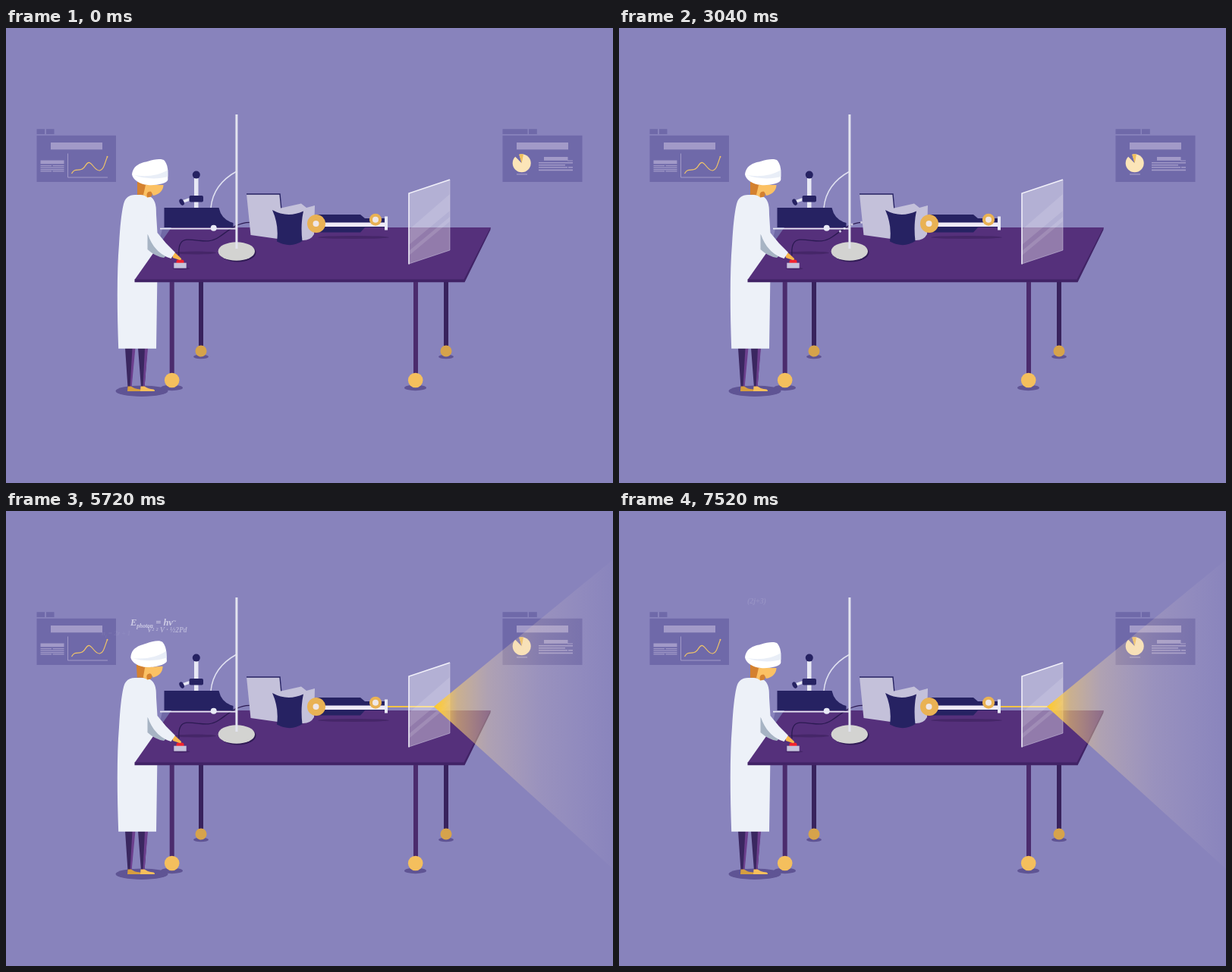
An HTML page that plays this animation: 800 px wide and 600 px high, repeating every 8.4 s.

```html
<!DOCTYPE html>
<html lang="en">
<head>
<meta charset="utf-8">
<title>Optics lab</title>
<style>
html, body { margin: 0; width: 100%; height: 100%; overflow: hidden; background: #8883bc; }
svg { display: block; width: 100vw; height: 100vh; }
.navy { fill: #262262; }
.pale { fill: #e8e9f5; }
.shade { fill: #5f5494; }
.coat { fill: #edf1f8; }
.panel { fill: #6f69a9; }
.bar { fill: #a29ac8; }
.formula { font: italic bold 10px "Liberation Serif", serif; fill: #f4f3fb; }
.formula .sub { font-size: .6em; }
</style>
</head>
<body>
<svg viewBox="0 0 800 600">
  <defs>
    <linearGradient id="glow" gradientUnits="userSpaceOnUse" x1="564" y1="0" x2="800" y2="0">
      <stop offset="0" stop-color="#ffc928"/>
      <stop offset=".06" stop-color="#fccb48" stop-opacity=".86"/>
      <stop offset=".13" stop-color="#f7ce70" stop-opacity=".6"/>
      <stop offset=".3" stop-color="#efd3a2" stop-opacity=".38"/>
      <stop offset=".6" stop-color="#e8d4c4" stop-opacity=".18"/>
      <stop offset="1" stop-color="#e0d2da" stop-opacity=".02"/>
    </linearGradient>
    <clipPath id="glassShape"><path d="M531 218L585 200V293L531 311Z"/></clipPath>
  </defs>
  <rect width="800" height="600" fill="#8883bc"/>

  <!-- wall panels -->
  <path class="panel" d="M40.5 133.3h10.5v6.7h-10.5zM53 133.3h10.5v6.7H53zM40.5 141.7H145V203H40.5z"/>
  <path class="bar" d="M59 151h68v9.2H59zM45.5 174.6h31v4.6h-31zM45.5 181h14.5v1.3h-14.5zM61.5 181h15v1.3h-15zM45.5 183.5h31v1.3h-31zM45.5 186h31v1.3h-31zM45.5 188.3h14.5v1.3h-14.5zM61.5 188.3h15v1.3h-15z"/>
  <path d="M81.5 165.5V197H134" fill="none" stroke="#a29ac8"/>
  <path d="M86.5 192C90 185 94 188 99 186.5C105 185 105 177 109.5 177.3C114 178 117 188.5 123.500 188C129 187 130 178 133.5 170" fill="none" stroke="#f0c468" stroke-width="1.2"/>
  <circle cx="133.5" cy="169.7" r="1" fill="#f0c468"/>

  <path class="panel" d="M654.5 133.3H687.5v6.7H654.5zM689 133.3h10.8v6.7H689zM654.5 141.7h105V203h-105z"/>
  <path class="bar" d="M673 151h68v9.2h-68zM709 170h31.5v4.8H709zM702 177h45v1.4h-45zM702 180h35v1.4h-35zM702 183h38v1.4h-38zM741 183h6v1.4h-6zM702 186.6h45v1.6h-45zM673 192.3h14v1.2h-14zM740 174.5h7v1h-7z"/>
  <circle cx="679.7" cy="178.3" r="12" fill="#fce5b8"/>
  <path d="M679.7 178.3L670 168.5L676 165.5Z" fill="#6f69a9"/>
  <path d="M679.7 178.3L676.2 166.8Q679 165.9 682 166.5Z" fill="#f0c05c"/>

  <!-- floor shadows and rear legs -->
  <g class="shade">
    <ellipse cx="179" cy="478.7" rx="34.5" ry="7.2"/>
    <ellipse cx="218.5" cy="474.4" rx="14.5" ry="3.8"/>
    <ellipse cx="257" cy="433.5" rx="10" ry="2.8"/>
    <ellipse cx="539.5" cy="474.4" rx="14.5" ry="3.8"/>
    <ellipse cx="580" cy="433.5" rx="10" ry="2.8"/>
  </g>
  <path d="M254 333h6v88h-6zM577 333h6v88h-6z" fill="#38225d"/>
  <g fill="#d6a34b"><circle cx="257" cy="426" r="7.5"/><circle cx="580" cy="426" r="7.5"/></g>

  <!-- scientist -->
  <path d="M157 422h12.5L165 474h-4.5zM174 422h12.5L182.5 474H178z" fill="#3a2760"/>
  <path d="M166.5 422h4L165.5 474h-2zM183 422h4L182.5 474h-2z" fill="#6c3f8d"/>
  <path d="M160.5 472.5H165Q169 476 177 476.5Q179 478 177.5 479H160Z" fill="#d69e3f"/>
  <path d="M177.5 472.5H182.5Q187 476 194.5 476.5Q197 478 195.5 479H177Z" fill="#f6bf5c"/>
  <path class="coat" d="M148.2 422.8Q145 335 149 285Q151 248 155 232Q158 220 170 220H184Q196 222 197.5 236L199.3 335L198 422.8Z"/>
  <g id="head">
    <path d="M173 203H194V216L188 223Q180 219 173 220Z" fill="#d4812f"/>
    <path d="M184 207H207.5Q207 218 194 221Q191 214 187 217L187 224L181 220Z" fill="#fbc164"/>
    <path d="M186 223Q184 216 190 215.5Q193 216 192.5 221Q190 224 186 223Z" fill="#d4812f"/>
    <path d="M166 193C167 186 170 183 173 181C178 177 184 177 188 175.5C195 173 206 171.5 209 175C212 179 213.5 184 213.3 190V200C213 205 197 208 187 207C176 206 167 200 166 193Z" fill="#fff"/>
    <path d="M168 193.500C181 197 202 195 213.3 187V196C200 200 181 199 168 193.500Z" fill="#e9eef7"/>
  </g>

  <!-- table -->
  <path d="M206 265H218L200 290Z" fill="#7069a6"/>
  <path d="M218 263H639L604.5 332H169.5Z" fill="#55307b"/>
  <path d="M169.5 331.5H603.5L638.5 263V266L604.5 335.3H169.5Z" fill="#412366"/>
  <path d="M215.7 335h6v122h-6zM537 335h6v122h-6z" fill="#4b2b6d"/>
  <g fill="#f4bf5d"><circle cx="218.7" cy="464.5" r="9.8"/><circle cx="539.7" cy="464.5" r="9.8"/></g>
  <g fill="#452668">
    <ellipse cx="250" cy="296.5" rx="27" ry="2"/>
    <ellipse cx="458" cy="276" rx="47" ry="2"/>
    <ellipse cx="231" cy="317.3" rx="11.5" ry="1.4"/>
  </g>

  <!-- cable and stand -->
  <path id="cable" d="M228 300C227 288 229 280 238 279.2C253 278 266 286 281 275.5C292 268.5 303 256.5 321 256.3" fill="none" stroke="#2b1a52" stroke-width="1.3"/>
  <g id="pulses" fill="#cfcce2"></g>
  <path class="navy" d="M208.5 237H280.5Q284 253 299.5 257V263H208.5Z"/>
  <path d="M203 264.6H304" stroke="#e8e9f5" stroke-width="1.8"/>
  <circle class="pale" cx="273.7" cy="263.8" r="4"/>
  <path class="pale" d="M248 196h5.5v41H248z"/>
  <path d="M233 229L243 225.5" stroke="#e8e9f5" stroke-width="3.5"/>
  <circle class="navy" cx="250.8" cy="193.6" r="5"/>
  <rect class="navy" x="241.5" y="221" width="18.5" height="8.6" rx="2"/>
  <ellipse class="navy" cx="231.6" cy="229.6" rx="2.8" ry="4.5" transform="rotate(-28 231.6 229.6)"/>
  <path d="M270 237Q273 206 304 189" fill="none" stroke="#e0e1f1" stroke-width="1.5"/>
  <ellipse cx="305.5" cy="296" rx="24" ry="12.5" fill="#301b55"/>
  <ellipse cx="303.8" cy="294.5" rx="24.2" ry="12.3" fill="#d3d3d1"/>
  <path d="M302.4 114h3v177h-3z" fill="#e3e4ef"/>

  <!-- projector -->
  <path d="M317 219H361L364 244L358 278L322.5 273Z" fill="#c4c1da"/>
  <path d="M317 219H361L363 240" fill="none" stroke="#262262" stroke-width="1.4"/>
  <path d="M351 240L389 231.5L396 237L407 234L392 243Q372 252 351 240Z" fill="#c4c1da"/>
  <path class="navy" d="M410 246H467L473 251H500V263H473L467 269.5H410Z"/>
  <path d="M407 234L406 272Q401 281 389 280Q388 250 392 241Z" fill="#c4c1da"/>
  <path class="navy" d="M351 240Q371 251 392 241.5Q388 259 390.5 281Q375 291 357 281.5Q360 260 351 240Z"/>
  <path d="M415 256.5h85v5.5h-85z" fill="#eeeaf6"/>
  <g fill="#e9b254"><circle cx="409" cy="258" r="12"/><circle cx="487" cy="252.7" r="8"/></g>
  <g fill="#efe7e8"><circle cx="408.5" cy="258" r="4"/><circle cx="487" cy="252.7" r="4"/></g>
  <path class="pale" d="M499 248.5h4v18h-4z"/>

  <!-- light and glass -->
  <path id="ray" d="M503 258H566" stroke="#f6c445" stroke-width="2.2" stroke-dasharray="63"/>
  <g clip-path="url(#glassShape)" fill="#fff">
    <path d="M531 200H585V311H531Z" opacity=".36"/>
    <path d="M531 266L585 219V241L531 286ZM531 294L585 249V255L531 300Z" opacity=".13"/>
  </g>
  <path d="M531 311.5V218L585 200" fill="none" stroke="#f2f1fa" stroke-width="1.6"/>
  <path d="M585 200V293L531 311" fill="none" stroke="#d8d5ea" stroke-opacity=".6" stroke-width=".8"/>
  <path id="cone" d="M564 258L800 64V472Z" fill="url(#glow)"/>

  <!-- button and arm -->
  <path id="knob" d="M224.5 311V308Q224.5 305.5 227 305.5H232Q234.5 305.5 234.5 308V311Z" fill="#f2242f"/>
  <path d="M221.3 309.7h16.4v7h-16.4z" fill="#c6c3dc"/>
  <path id="hand" d="M219 298L223 296.5L230.5 303.5Q232 306 229 306L220 303Z" fill="#f8b64b"/>
  <path d="M186.5 272V292Q196 301 208 303L214 298Z" fill="#a7b4c4"/>
  <path class="coat" d="M184 224Q196 224 197.5 238L199.5 270Q210 284 223 296L217.5 304Q204 300 195 288Q188 278 186 268Z"/>

  <g id="formulas"></g>
</svg>
<script>
const LOOP = 8400, STEP = 40;
const $ = id => document.getElementById(id);
const clamp = v => Math.max(0, Math.min(1, v));
const ease = v => (1 - Math.cos(Math.PI * clamp(v))) / 2;
const span = (t, from, to) => clamp((t - from) / (to - from));

const sub = s => `<tspan class="sub" dy="3">${s}</tspan><tspan dy="-3">&#8203;</tspan>`;
const sup = s => `<tspan class="sub" dy="-3">${s}</tspan><tspan dy="3">&#8203;</tspan>`;

// text, size, x, start y, end y, start, end, peak and resting opacity
const formulas = [
  [`E${sub('select')} + ${sup('½')}/2i`, 10.5, 220, 185, 158, 3900, 4860, .75, 0],
  [`n${sub('i')} = 2r + 1`, 9, 126, 190, 162, 4700, 5800, .5, 0],
  [`E${sub('photon')} = hν${sup('~')}`, 12.5, 164, 162, 137, 5200, 6400, .65, 0],
  ['V² ² V · ½2Pd', 9.5, 186, 165, 130, 5500, 7000, .75, .1],
  ['(2j+3)', 10, 169, 170, 121.5, 6600, 7360, .75, .13]
].map(([html, size, x, y0, y1, from, to, peak, rest]) => {
  const el = document.createElementNS('http://www.w3.org/2000/svg', 'text');
  el.setAttribute('class', 'formula');
  el.setAttribute('x', x);
  el.style.fontSize = size + 'px';
  el.innerHTML = html;
  $('formulas').append(el);
  return { el, y0, y1, from, to, peak, rest };
});
formulas[3].rest = 0;

const cable = $('cable'), cableLength = cable.getTotalLength();
const pulses = [0, 13, 24, 31].map(lag => {
  const el = document.createElementNS('http://www.w3.org/2000/svg', 'circle');
  el.setAttribute('r', 1.6);
  $('pulses').append(el);
  return { el, lag };
});

const nodStarts = [5960, 4940, 3920, 0];
function nod(t) {
  const age = t - nodStarts.find(s => t >= s);
  return age < 740 ? ease(age / 700) : 1 - ease((age - 740) / 300);
}

function draw(t) {
  const lift = nod(t);
  $('head').setAttribute('transform', `translate(0 ${-.8 * lift}) rotate(${-3.4 * lift} 183 223)`);

  const press = ease(span(t, 1320, 1480)) - ease(span(t, 1560, 1760));
  $('knob').setAttribute('transform', `translate(0 ${1.5 * press})`);
  $('hand').setAttribute('transform', `translate(0 ${1.2 * press})`);

  for (const { el, lag } of pulses) {
    const distance = (t - 1360) * .068 - lag;
    const visible = distance > 0 && distance < cableLength;
    el.setAttribute('opacity', visible ? 1 : 0);
    if (!visible) continue;
    const p = cable.getPointAtLength(distance);
    el.setAttribute('cx', p.x);
    el.setAttribute('cy', p.y);
  }

  $('ray').setAttribute('stroke-dashoffset', 63 * (1 - span(t, 3480, 3640)));
  $('ray').setAttribute('opacity', t > 3480 ? 1 : 0);
  $('cone').setAttribute('opacity', ease(span(t, 3620, 3960)));

  for (const f of formulas) {
    const p = span(t, f.from, f.to);
    const fade = Math.max(f.rest, f.peak * Math.min(1, (1 - p) / .55));
    f.el.setAttribute('y', f.y0 + (f.y1 - f.y0) * p);
    f.el.setAttribute('opacity', clamp(p / .25) * fade);
  }
}

const start = performance.now();
function tick() {
  const t = (performance.now() - start) % LOOP;
  draw(Math.floor(t / STEP) * STEP);
  requestAnimationFrame(tick);
}
tick();
</script>
</body>
</html>
```
